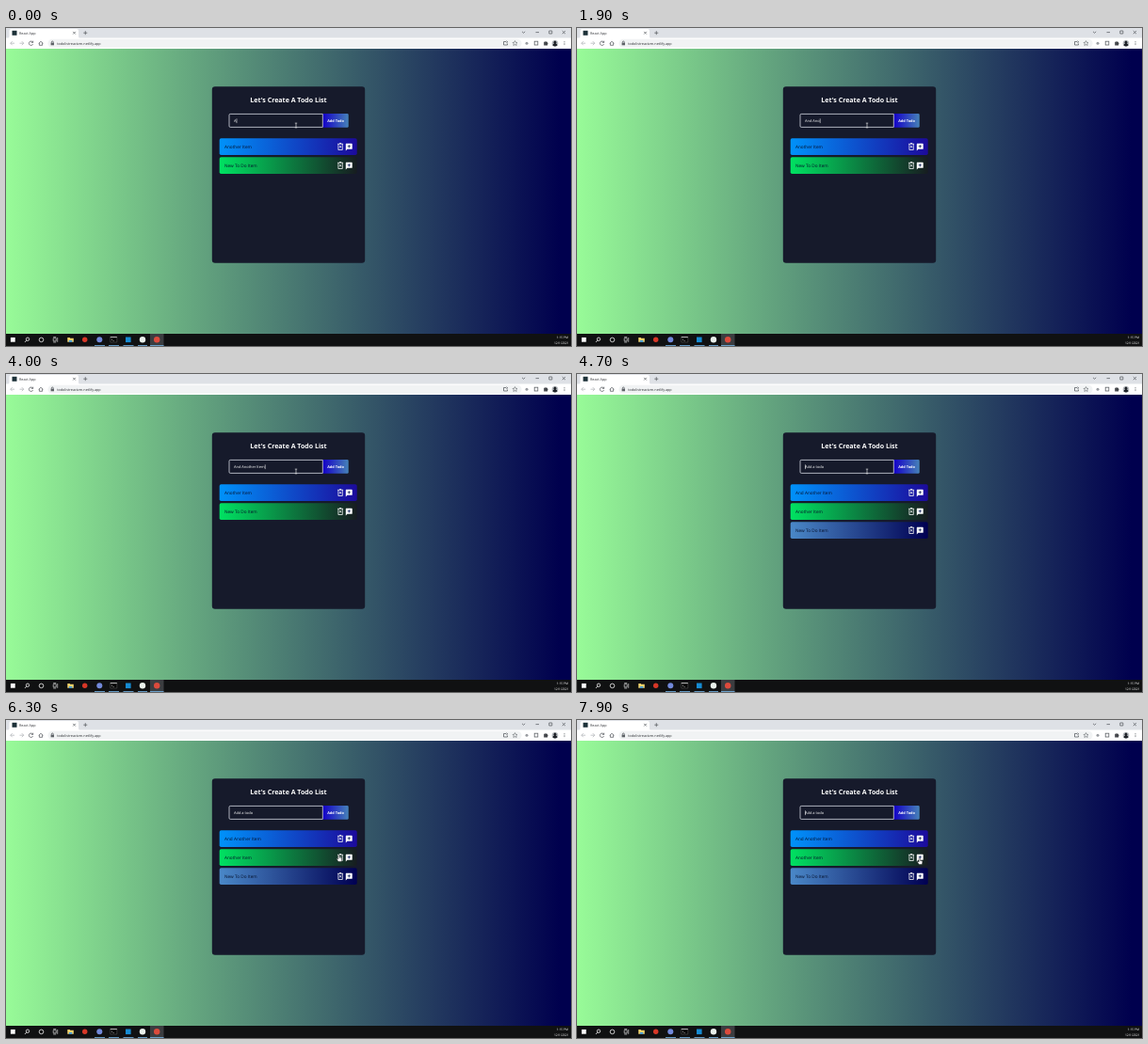
Write an HTML page that moves like this. It is 600 by 338 pixels and loops after 8000 ms.

```html
<!DOCTYPE html>
<html lang="en">
<head>
<meta charset="utf-8">
<title>Todo list</title>
<style>
  html, body { margin: 0; width: 100%; height: 100%; overflow: hidden; background: #161a2b; }
  svg { display: block; width: 100%; height: 100%; }
  text { font-family: "Open Sans", "Noto Sans", sans-serif; text-rendering: geometricPrecision; white-space: pre; }
  .line { fill: none; stroke: #5f6368; stroke-width: .8; }
  .light { fill: none; stroke: #f4f4f4; stroke-width: .8; }
  .small { font-size: 3.75px; fill: #303236; }
  .clock { font-size: 3.3px; fill: #fff; text-anchor: end; }
  .label { font-size: 4.7px; fill: #06102a; }
  .field { font-size: 3.95px; fill: #fff; }
</style>
</head>
<body>
<svg viewBox="0 0 600 338" preserveAspectRatio="none">
  <defs>
    <linearGradient id="page"><stop stop-color="#98fb98"/><stop offset=".98" stop-color="#00004e"/></linearGradient>
    <linearGradient id="add"><stop stop-color="#1400c8"/><stop offset="1" stop-color="#4682b8"/></linearGradient>
    <linearGradient id="blue"><stop stop-color="#0092fa"/><stop offset="1" stop-color="#1c0a9c"/></linearGradient>
    <linearGradient id="green"><stop stop-color="#00e262"/><stop offset="1" stop-color="#171c20"/></linearGradient>
    <linearGradient id="steel"><stop stop-color="#4a88c8"/><stop offset="1" stop-color="#000052"/></linearGradient>
    <g id="icons">
      <path class="light" d="M352.1 123.3h6M354 122.5h2.2M352.9 123.3v6.2h4.4v-6.2M354.2 125.2l1.8 2.2m0-2.2l-1.8 2.2"/>
      <path d="M361.3 122.8h5.8q.6 0 .6.6v4.8q0 .6-.6.6h-4.6l-1.7 1.6v-7q0-.6.5-.6z" fill="#fff"/>
      <path d="M364.3 124.2v3.2M362.7 125.8h3.2" stroke="#10205a" stroke-width=".8"/>
    </g>
  </defs>

  <rect y="22" width="600" height="304" fill="url(#page)"/>

  <!-- browser bar -->
  <rect width="600" height="11" fill="#dee1e6"/>
  <path d="M2 11q1.5 0 1.5-2V3q0-2 2-2H75q2 0 2 2v6q0 2 1.500 2z" fill="#fff"/>
  <rect y="10.500" width="600" height="11.500" fill="#fff"/>
  <rect x="6.500" y="2.800" width="5" height="5" fill="#1d3138"/>
  <text class="small" x="14" y="6.700">React App</text>
  <path class="line" d="M71.200 3.900l2.600 2.600m0-2.600l-2.600 2.600M82.300 5.200h4M84.300 3.200v4M548 3.800l1.600 1.500 1.600-1.500M562.500 4.600h3.500M576.800 3h3v3h-3zM590.800 3l3.200 3.200m0-3.200l-3.200 3.200"/>
  <rect x="44.500" y="11.800" width="503" height="9" rx="4.500" fill="#f1f3f4"/>
  <g class="line">
    <path d="M9 16.200H4.800M6.700 14.200l-2 2 2 2M14.500 16.200h4.200M16.800 14.200l2 2-2 2" stroke="#b4b7ba"/>
    <path d="M28.500 15.200a2.200 2.200 0 1 0 .1 1.900M28.700 13.700v1.700H27M34.700 16.300l2.300-2 2.300 2M35.400 16v2.300h3.200V16"/>
    <path d="M48.300 15.800v-.8a1 1 0 0 1 2 0v.8"/>
    <path d="M528.500 14.500h2.500M528.500 14.500v3.500h4v-1.500M531.300 13.800l1.500 1-1.500 1"/>
    <path d="M540.500 13.600l.8 1.700 1.700.2-1.200 1.200.3 1.800-1.600-.9-1.600.9.3-1.800-1.200-1.200 1.700-.2z" stroke-width=".6"/>
    <rect x="561.200" y="14.200" width="3.600" height="3.800"/>
  </g>
  <rect x="47.600" y="15.700" width="3.400" height="2.600" fill="#5f6368"/>
  <text class="small" x="54.200" y="17.600">todolistreactzm.netlify.app</text>
  <circle cx="553" cy="16.200" r="1.500" fill="#999ca1"/>
  <path d="M571.200 14.700h1.200q.6-1.600 1.300 0h1.400v1.400q1.300.6 0 1.300v1.200h-3.900z" fill="#44474b"/>
  <circle cx="583" cy="16.200" r="3.300" fill="#b8bcc0"/>
  <path d="M580.500 18.400q.2-1.800 1.700-2a1.500 1.500 0 1 1 1.600 0q1.500.2 1.700 2-2.500 2-5 0z" fill="#20242a"/>
  <path d="M593 14.300v.8m0 .7v.8m0 .7v.8" stroke="#5f6368"/>

  <!-- taskbar -->
  <rect y="325" width="600" height="13" fill="#101112"/>
  <rect x="153" y="325" width="14.500" height="13" fill="#3b3d40"/>
  <path d="M94 337.500h11M109 337.500h11M124.500 337.500h11M140 337.500h10M153 337.500h14.500" stroke="#76b9ed" stroke-width=".8"/>
  <rect x="4.900" y="328.900" width="4.800" height="4.800" fill="#fff"/>
  <g class="light">
    <circle cx="23" cy="330.700" r="1.700"/><path d="M21.800 332l-1.900 2"/>
    <circle cx="37.500" cy="331.400" r="2.300"/>
    <path d="M50.200 329.800h3v3h-3zM54.700 329v4.800M50.200 328.500h3M50.200 334h3" stroke-width=".6"/>
  </g>
  <path d="M65.300 329h2.300l.7.800h3.500v4h-6.500z" fill="#f6d36b"/>
  <path d="M66.800 332h3.500v1.800h-3.500z" fill="#3f9bdc"/>
  <circle cx="83.700" cy="331.300" r="2.700" fill="#d73727"/>
  <circle cx="99.300" cy="331.300" r="3" fill="#7289da"/>
  <path d="M110.800 328.400h7v5.600h-7z" fill="#050505" stroke="#777" stroke-width=".4"/>
  <path d="M110.800 328.600h7" stroke="#ddd" stroke-width=".8"/>
  <path d="M112 330.500l1 .8-1 .8M113.500 332.500h1.500" fill="none" stroke="#eee" stroke-width=".4"/>
  <rect x="127" y="328.500" width="5.600" height="5.600" fill="#168bd2"/>
  <circle cx="145" cy="331.300" r="3.200" fill="#e8f0ea"/>
  <circle cx="160.200" cy="331.300" r="3.200" fill="#dc4a3c"/>
  <text class="clock" x="597" y="330">1:15 PM</text>
  <text class="clock" x="597.500" y="335.700">12/1/2021</text>

  <!-- todo card -->
  <rect x="218.800" y="62.300" width="162.400" height="187.400" rx="3.200" fill="#161a2b"/>
  <text x="300" y="79.200" text-anchor="middle" font-size="7.050" font-weight="700" fill="#fff">Let's Create A Todo List</text>
  <path d="M336.500 91H362.300q1.400 0 1.400 1.400v12q0 1.400-1.400 1.400H336.500z" fill="url(#add)"/>
  <path d="M336.300 91.400H238.200q-1.200 0-1.200 1.200v11.600q0 1.200 1.200 1.200h98.100z" fill="none" stroke="#d5d8e2" stroke-width=".8"/>
  <text x="350" y="99.800" text-anchor="middle" font-size="3.850" font-weight="700" fill="#fff">Add Todo</text>
  <text id="field" class="field" x="242" y="99.900"></text>
  <rect id="caret" y="96.300" width=".55" height="4.800" fill="#fff"/>
  <g id="list"></g>

  <!-- pointers, each with its hot spot at 0,0 -->
  <g id="pointer">
    <path id="beam" d="M-1.200-2.400h2.400M0-2.400v4.800M-1.200 2.400h2.400" fill="none" stroke="#f2f2f2" stroke-width=".6"/>
    <path id="arrow" d="M0 0v4.300l1-.9.7 1.500.8-.4-.7-1.400h1.400z" fill="#fff" stroke="#111" stroke-width=".25"/>
    <path id="hand" d="M-.6.500q.6-1 1.200 0v2.300l2 .5q.7.200.6 1L2.700 7H-.5L-2.200 4.600q-.3-.9.600-.8l1 .8z" fill="#fff" stroke="#111" stroke-width=".4"/>
  </g>
</svg>
<script>
  const LOOP = 8000, SUBMIT = 4300, BLINK = 1060, BLINK_START = 4500;
  const MESSAGE = 'And Another Item';
  const keyTimes = [0, 300, 600, 900, 1250, 1550, 1800, 2000, 2150, 2300, 2480, 2640, 2800, 2960, 3120, 3320];
  const path = [[4850, 308, 103.500], [5400, 327.200, 129.800], [5950, 353.500, 143.500], [6900, 353.500, 143.500], [7400, 363.700, 146.500]];
  const fills = ['blue', 'green', 'steel'];
  const before = ['Another Item', 'New To Do Item'];
  const after = [MESSAGE, ...before];
  const el = id => document.getElementById(id);
  const show = (id, on) => el(id).setAttribute('visibility', on ? 'visible' : 'hidden');
  let lastList, lastText, textEnd = 242;

  const row = (label, i) => `<g transform="translate(0 ${i * 20})">
    <rect x="226.700" y="117.200" width="146" height="17.800" rx="1.800" fill="url(#${fills[i]})"/>
    <text class="label" x="232" y="127.700">${label}</text><use href="#icons"/></g>`;

  function pointerAt(t) {
    if (t <= path[0][0]) return path[0].slice(1);
    const next = path.findIndex(p => p[0] > t);
    if (next < 0) return path[path.length - 1].slice(1);
    const [t0, x0, y0] = path[next - 1], [t1, x1, y1] = path[next];
    const u = (t - t0) / (t1 - t0), ease = u * u * (3 - 2 * u);
    return [x0 + (x1 - x0) * ease, y0 + (y1 - y0) * ease];
  }

  function draw(now) {
    const t = now % LOOP, submitted = t >= SUBMIT;
    const list = submitted ? after : before;
    if (list !== lastList) {
      el('list').innerHTML = list.map(row).join('');
      lastList = list;
    }

    const text = submitted ? 'Add a todo' : MESSAGE.slice(0, keyTimes.filter(k => k <= t).length);
    if (text !== lastText) {
      el('field').textContent = text;
      textEnd = submitted ? 242 : 242.200 + el('field').getComputedTextLength();
      lastText = text;
    }
    el('caret').setAttribute('x', textEnd);
    show('caret', t < BLINK_START || (t - BLINK_START) % BLINK < BLINK / 2);

    const [x, y] = pointerAt(t);
    const shape = y < 106 ? 'beam' : x > 351.500 ? 'hand' : 'arrow';
    el('pointer').setAttribute('transform', `translate(${x} ${y})`);
    for (const id of ['beam', 'arrow', 'hand']) show(id, id === shape);
  }

  const start = performance.now();
  function tick() {
    draw(performance.now() - start);
    requestAnimationFrame(tick);
  }
  tick();
</script>
</body>
</html>
```
